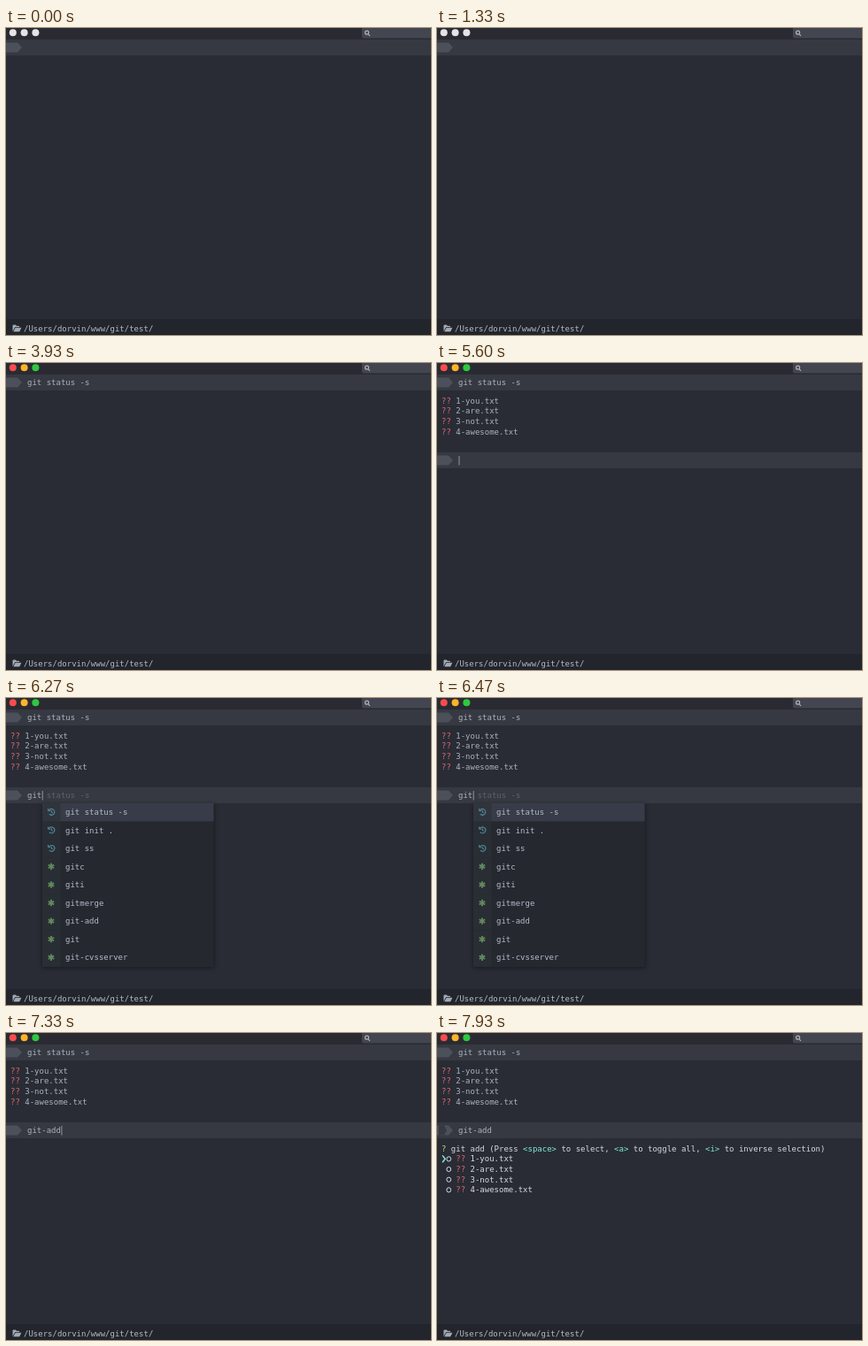
These frames come from a looping animation (480x347 px, 8000 ms). An HTML page with a canvas:

```html
<!DOCTYPE html>
<html lang="en">
<head>
<meta charset="utf-8">
<title>Terminal</title>
<style>
html, body { margin: 0; width: 100%; height: 100%; overflow: hidden; background: #292c34; }
canvas { display: block; }
</style>
</head>
<body>
<canvas width="480" height="347"></canvas>
<script>
const ctx = document.querySelector('canvas').getContext('2d');
const CHAR = 5.418, LINE = 11.67, ROW = 20.55, LOOP = 8000;
const DIM = '#a9b2c1', BRIGHT = '#d3dae6', RED = '#dc6674', CYAN = '#80e9dc';
const FILES = ['1-you.txt', '2-are.txt', '3-not.txt', '4-awesome.txt'];
const ITEMS = ['git status -s', 'git init .', 'git ss', 'gitc', 'giti', 'gitmerge', 'git-add', 'git', 'git-cvsserver'];
const MOVES = [6730, 6800, 6870, 6930, 7000, 7070];

function rect(x, y, w, h, color) {
  ctx.fillStyle = color;
  ctx.fillRect(x, y, w, h);
}

function text(str, x, y, color = DIM) {
  ctx.fillStyle = color;
  ctx.fillText(str, x, y);
}

function dot(x, y, r, color) {
  ctx.fillStyle = color;
  ctx.beginPath();
  ctx.arc(x, y, r, 0, 7);
  ctx.fill();
}

function stroke(path, color, width = 1) {
  ctx.strokeStyle = color;
  ctx.lineWidth = width;
  ctx.stroke(new Path2D(path));
}

function fill(path, color) {
  ctx.fillStyle = color;
  ctx.fill(new Path2D(path));
}

function mix(a, b, k) {
  return `rgb(${a.map((v, i) => v + (b[i] - v) * k)})`;
}

function titleBar(t) {
  rect(0, 0, 480, 13, '#2a2b32');
  const focus = Math.min(1, Math.max(0, (t - 2600) / 130));
  [[252, 75, 78], [253, 179, 42], [47, 200, 64]].forEach((color, i) =>
    dot(7.8 + i * 12.8, 5.3, 4, mix([228, 227, 229], color, focus)));
  fill('M402 0H480V11.5H404Q402 11.5 402 9.5Z', '#434650');
  stroke('M409.6 5.2A2 2 0 1 1 405.6 5.2A2 2 0 1 1 409.6 5.2M409 6.8L411 8.8', '#b2b4ba', 1.2);
}

function footer() {
  rect(0, 329, 480, 18, '#22252b');
  fill('M7.5 343V336.5Q7.5 335.6 8.4 335.6H10.8L12 336.8H14.4Q15.2 336.8 15.2 338H10.2Z', '#a2a9b6');
  fill('M8.3 343.3L10.6 338.8H17.4L15.2 343.3Z', '#a2a9b6');
  text('/Users/dorvin/www/git/test/', 20, 343, '#b5bcc9');
}

function promptRow(y, cmd, cursor, running, t) {
  rect(0, y, 480, 18, '#363941');
  const top = y + 3.5, mid = y + 9, low = y + 14.5;
  fill(`M0 ${top}H13L18 ${mid}L13 ${low}H0Z`, '#4c505a');
  if (running) {
    const x = 2 + (t - 7930) / 67 * 3 % 18;
    for (const left of [x - 18, x, x + 18])
      fill(`M${left} ${top}h6l3 5.5l-3 5.5h-6Z`, '#363941');
  }
  text(cmd, 24, y + 12);
  if (cursor) rect(24.5 + cmd.length * CHAR, y + 4, 1, 10.5, '#8d939f');
}

function fileList() {
  FILES.forEach((name, i) => {
    const y = 45.7 + i * LINE;
    text('??', 5, y, RED);
    text(name, 5 + 3 * CHAR, y);
  });
}

function menu(selected) {
  ctx.save();
  ctx.shadowColor = 'rgba(0,0,0,.45)';
  ctx.shadowBlur = 5;
  ctx.shadowOffsetY = 1;
  rect(41, 119, 193.5, 185, '#25282f');
  ctx.restore();
  ITEMS.forEach((item, i) => {
    const top = 118.8 + i * ROW, mid = top + 10;
    if (i === selected) rect(41, top, 193.5, ROW, '#383c48');
    rect(41, top, 20.5, ROW, i === selected ? '#30343d' : '#292d34');
    if (i < 3) {
      ctx.strokeStyle = '#508696';
      ctx.lineWidth = 1.2;
      ctx.beginPath();
      ctx.arc(51.4, mid, 3.4, -2.7, 2.4);
      ctx.stroke();
      stroke(`M47.6 ${mid - 4}V${mid - 1.2}H50.4M51.4 ${mid - 2}V${mid + .6}H53`, '#508696');
    } else {
      for (let a = 0; a < 3; a++) {
        const dx = 3.7 * Math.sin(a * Math.PI / 3), dy = 3.7 * Math.cos(a * Math.PI / 3);
        stroke(`M${51 - dx} ${mid - dy}L${51 + dx} ${mid + dy}`, '#60895f', 1.9);
      }
    }
    text(item, 67, mid + 3.2, '#b3bbc8');
  });
}

function picker() {
  const parts = [['? ', '#b5d98c'], ['git add (Press ', BRIGHT], ['<space>', CYAN], [' to select, ', BRIGHT],
    ['<a>', CYAN], [' to toggle all, ', BRIGHT], ['<i>', CYAN], [' to inverse selection)', BRIGHT]];
  let col = 0;
  for (const [str, color] of parts) {
    text(str, 5 + col * CHAR, 133.7, color);
    col += str.length;
  }
  FILES.forEach((name, i) => {
    const y = 133.7 + (i + 1) * LINE;
    stroke(`M15.7 ${y - 3}A2.4 2.6 0 1 1 10.9 ${y - 3}A2.4 2.6 0 1 1 15.7 ${y - 3}`, BRIGHT);
    text('??', 5 + 3 * CHAR, y, RED);
    text(name, 5 + 6 * CHAR, y, BRIGHT);
  });
  stroke('M6.2 138.4L9.2 142.3L6.2 146.2', CYAN, 1.5);
}

function draw(t) {
  rect(0, 0, 480, 347, '#292c34');
  ctx.font = '9px "DejaVu Sans Mono", monospace';
  titleBar(t);
  footer();
  const cursor1 = t >= 2730 && t < 3930 && !(t >= 3130 && t < 3400);
  promptRow(13, t < 3400 ? '' : 'git status -s', cursor1, false, t);
  if (t < 4200) return;

  fileList();
  const typed = t < 5870 ? '' : t < 6000 ? 'g' : t < 6130 ? 'gi' : t < 7200 ? 'git' : 'git-add';
  const cursor2 = t < 7600 && !(t >= 4870 && t < 5400);
  promptRow(101, typed, cursor2, t >= 7600, t);
  if (t >= 6000 && t < 7200) {
    const selected = MOVES.filter(m => t >= m).length;
    text(ITEMS[selected].slice(typed.length), 24 + typed.length * CHAR, 113, '#5d626c');
    menu(selected);
  }
  if (t >= 7870) picker();
}

const start = performance.now();
function tick() {
  draw((performance.now() - start) % LOOP);
  requestAnimationFrame(tick);
}
tick();
</script>
</body>
</html>
```
